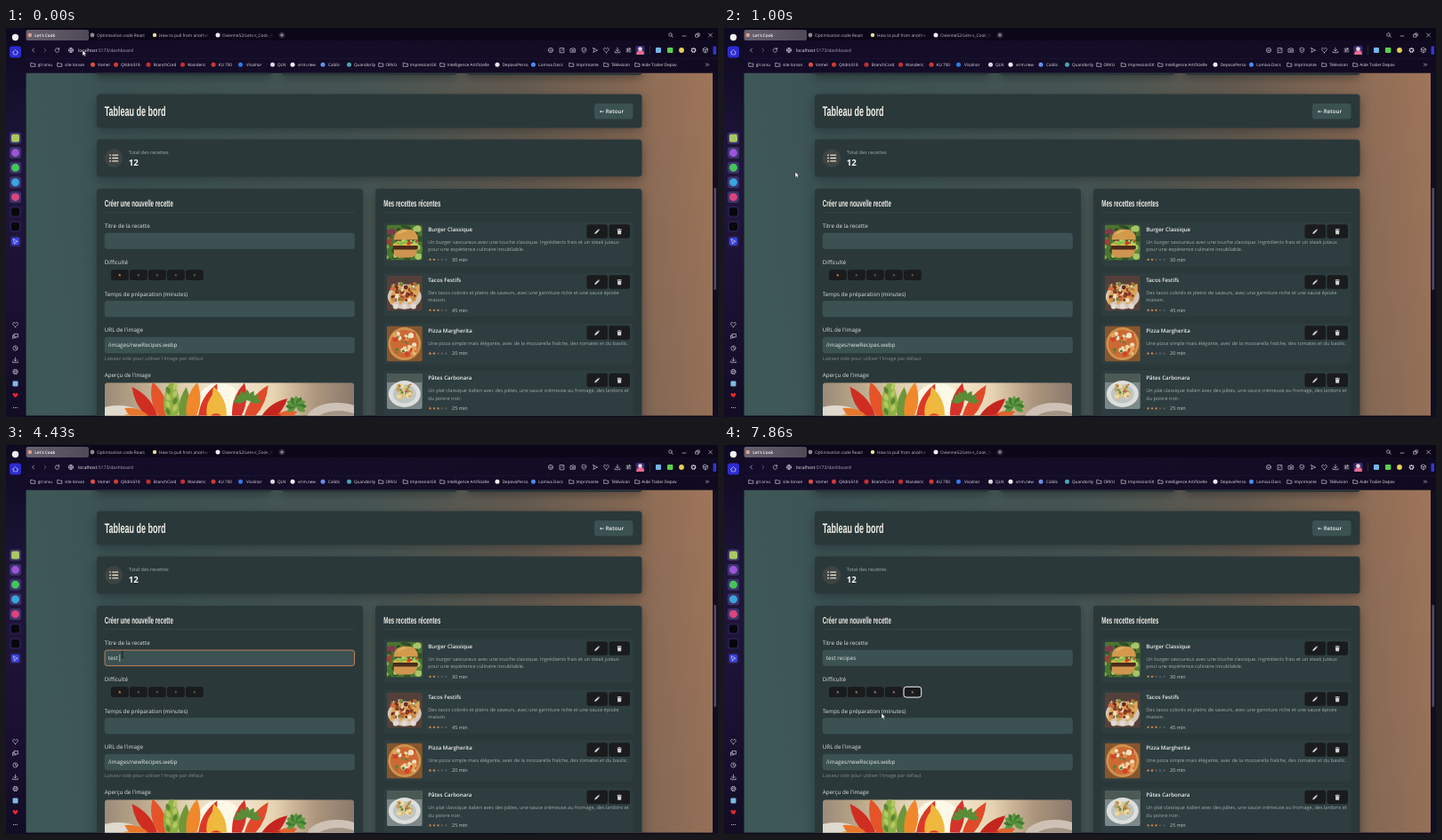
Animation, 800 px wide and 438 px high, one loop 8 s. Source, as an HTML page:

```html
<!DOCTYPE html>
<html lang="fr">
<head>
<meta charset="utf-8">
<title>Let's Cook</title>
<style>
html, body { margin: 0; width: 100%; height: 100%; overflow: hidden; background: #0b0718; }
svg { display: block; width: 100vw; height: 100vh; }
text { font-family: "Open Sans", "Noto Sans", sans-serif; white-space: pre; text-rendering: geometricPrecision; }
.head { font-family: "Liberation Sans", sans-serif; font-weight: 700; fill: #f1eee6; }
.card { fill: #2a383a; filter: drop-shadow(0 3px 6px rgba(14, 20, 22, .42)); }
.line { fill: none; stroke: #d6d3e0; stroke-width: .65; stroke-linecap: round; stroke-linejoin: round; }
.field { fill: #3b5152; stroke: #465b5b; stroke-width: .4; }
.field.on { stroke: #d08a5e; stroke-width: .9; }
.star { fill: #5c5e60; }
.star.lit { fill: #d88d55; }
.star.soft { fill: #a9846b; }
</style>
</head>
<body>
<svg id="stage" viewBox="0 0 800 438" preserveAspectRatio="none"></svg>
<script>
const stage = document.getElementById('stage');
const out = [];
const add = s => out.push(s);

const rect = (x, y, w, h, fill, r = 0, more = '') =>
  add(`<rect x="${x}" y="${y}" width="${w}" height="${h}" rx="${r}" fill="${fill}" ${more}/>`);
const dot = (x, y, r, fill, more = '') => add(`<circle cx="${x}" cy="${y}" r="${r}" fill="${fill}" ${more}/>`);
const oval = (x, y, rx, ry, fill) => add(`<ellipse cx="${x}" cy="${y}" rx="${rx}" ry="${ry}" fill="${fill}"/>`);
const text = (x, y, s, size, fill = '#e4e8e6', weight = 400, more = '') =>
  add(`<text x="${x}" y="${y}" font-size="${size}" fill="${fill}" font-weight="${weight}" ${more}>${s}</text>`);
const head = (x, y, s, size) =>
  add(`<text class="head" transform="translate(${x} ${y}) scale(.584 1)" font-size="${size}">${s}</text>`);
const icon = (x, y, d, more = '') => add(`<path class="line" transform="translate(${x} ${y})" d="${d}" ${more}/>`);
const leaf = (x, y, len, w, turn, fill) =>
  add(`<path transform="translate(${x} ${y}) rotate(${turn})" fill="${fill}" d="M0 0Q${w} ${-len / 2} 0 ${-len}Q${-w} ${-len / 2} 0 0z"/>`);

const starPath = r => {
  let d = '';
  for (let i = 0; i < 10; i++) {
    const a = Math.PI * (i / 5 - .5), q = i % 2 ? r * .42 : r;
    d += (i ? 'L' : 'M') + (q * Math.cos(a)).toFixed(2) + ' ' + (q * Math.sin(a)).toFixed(2);
  }
  return d + 'z';
};
const star = (x, y, r, cls, id = '') =>
  add(`<path ${id} class="star ${cls}" transform="translate(${x} ${y})" d="${starPath(r)}"/>`);

let seed = 7;
const rnd = () => (seed = (seed * 16807) % 2147483647) / 2147483647;
function scatter(n, x, y, w, h, r, colors) {
  for (let i = 0; i < n; i++)
    dot((x + rnd() * w).toFixed(1), (y + rnd() * h).toFixed(1), (r * (.5 + rnd() * .7)).toFixed(2), colors[i % colors.length]);
}
const clipTo = (id, x, y, w, h, r, draw) => {
  add(`<clipPath id="${id}"><rect x="${x}" y="${y}" width="${w}" height="${h}" rx="${r}"/></clipPath><g clip-path="url(#${id})">`);
  draw();
  add('</g>');
};
const grad = (id, dir, ...stops) => add(`<linearGradient id="${id}" ${dir}>` +
  stops.map(([o, c, a = 1]) => `<stop offset="${o}" stop-color="${c}" stop-opacity="${a}"/>`).join('') + '</linearGradient>');
const fade = (id, x) => grad(id, `gradientUnits="userSpaceOnUse" x1="${x - 10}" x2="${x}" y1="0" y2="0"`, [0, '#c4c0ce'], [1, '#c4c0ce', 0]);

grad('page', 'x1="0" y1="0.06" x2="1" y2="0"', [0, '#3e5757'], [.12, '#3d5354'], [.5, '#485755'], [.72, '#665c51'], [.9, '#8d6c56'], [1, '#9f7559']);
grad('bar', 'x1="0" y1="0" x2="1" y2="0"', [0, '#130c28'], [.5, '#140d27'], [1, '#100a20']);
grad('side', 'x1="0" y1="0" x2="0" y2="1"', [0, '#0e0920'], [.35, '#1f163b'], [.75, '#191031'], [1, '#120c24']);
grad('tab', 'x1="0" y1="0" x2="1" y2="0"', [0, '#68626f'], [1, '#4f4957']);
fade('fadeA', 229);
fade('fadeB', 301);

const FOLDER = 'M-2.4 -1.9h1.7l.8 .8h2.3v3.1h-4.8z';
const HEART = 'M0 2.6C-5 -.6 -2.4 -4.4 0 -1.5C2.4 -4.4 5 -.6 0 2.6z';
const RING = 'M2.6 0A2.6 2.6 0 1 1 -2.6 0A2.6 2.6 0 1 1 2.6 0';
const DOWN = 'M0 -2.8V1M-1.7 -.6L0 1.1L1.7 -.6M-2.8 1.2V2.7H2.8V1.2';

function browser() {
  rect(0, 0, 800, 438, '#0b0718');
  rect(22, 14, 778, 37, 'url(#bar)');
  rect(22, 34.6, 778, .4, '#221a40');
  rect(0, 0, 22, 438, 'url(#side)');

  // tabs
  rect(22.5, 2, 70.5, 12, 'url(#tab)', 2);
  dot(26.8, 8, 2.3, '#d9a08c');
  text(32.3, 10, 'Let\'s Cook', 4.65, '#fff', 600);
  dot(97, 8, 2.4, '#8b8892');
  text(102, 10, 'Optimisation code React', 4.75, '#c4c0ce');
  dot(167, 8, 2.2, '#e9d9a5');
  text(172, 10, 'How to pull from another', 4.75, 'url(#fadeA)');
  dot(238, 8, 2.5, '#f0eef5');
  text(243, 10, 'Ovienne52/Lets-s_Cook_Re', 4.75, 'url(#fadeB)');
  dot(310, 8, 3.5, '#2a2438');
  icon(310, 8, 'M-1.8 0H1.8M0 -1.8V1.8');
  icon(746.5, 7.5, 'M1.8 0A1.8 1.8 0 1 1 -1.8 0A1.8 1.8 0 1 1 1.8 0M1.3 1.3L2.9 2.9');
  icon(762, 9, 'M-2 0H2');
  icon(777, 8, 'M-2 -.8H1V2.1H-2zM-.8 -.8V-2H2.2V.9H1');
  icon(791.5, 8, 'M-2 -2L2 2M-2 2L2 -2');

  // address row
  icon(30.5, 25, 'M1 -2L-1 0L1 2');
  icon(44, 25, 'M-1 -2L1 0L-1 2', 'opacity=".5"');
  icon(57.5, 25, 'M1.9 -1.3A2.3 2.3 0 1 0 2.3 .5M2.2 -2.6V-1H.6');
  icon(73, 25, RING + 'M-2.6 0H2.6M0 -2.6Q-2.2 0 0 2.6Q2.2 0 0 -2.6');
  text(81, 27, 'localhost<tspan fill="#aaa5b8">:5173/dashboard</tspan>', 5.1, '#f1eff6');
  [RING + 'M-1.1 .6Q0 1.9 1.1 .6M-.9 -.8V-.6M.9 -.8V-.6', 'M-2.4 2.4V-2.4H2.4V2.4zM-.8 .8L1.4 -1.4',
    'M-2.6 -1.6H-1L-.5 -2.4H.7L1.2 -1.6H2.6V2.2H-2.6zM1 .3A1 1 0 1 1 -1 .3A1 1 0 1 1 1 .3',
    'M0 -2.7L2.3 -1.8V.2Q2 2 0 2.8Q-2 2 -2.3 .2V-1.8zM-1 0L-.2 .8L1.1 -.7', 'M-2.2 -2.4L2.6 0L-2.2 2.4L-1.3 0z',
    HEART, DOWN, 'M-2.4 -1.8H2.4M-2.4 0H2.4M-2.4 1.8H2.4M.9 -2.6V-1M-.9 -.8V.8'
  ].forEach((d, i) => icon(612 + i * 12.5, 25, d));
  rect(707.5, 20, 10, 10, '#3a2b74', 2);
  add('<path d="M708 30q1-5 5-5t4 5z" fill="#e76b8e"/>');
  dot(712.5, 23.5, 2.3, '#e8d7dc');
  rect(723, 20, .5, 10, '#4a4463');
  rect(730, 22, 6, 6, '#76b5e8', 1);
  rect(743, 22, 6.4, 6, '#5ad04c', 1);
  dot(759, 25, 2.9, '#e3cf58');
  dot(772.5, 25, 2.1, 'none', 'stroke="#f3f1f8" stroke-width="1.5" stroke-dasharray="1.2 .45"');
  icon(785.8, 25, 'M0 -2.8L2.5 -1.4V1.4L0 2.8L-2.5 1.4V-1.4zM-2.5 -1.4L0 0L2.5 -1.4M0 0V2.8');
  rect(794.5, 20.5, 3.5, 9.5, '#3434d6', 1);

  // bookmarks: icon x, text x, label, colour (none = folder)
  [[30.5, 35.7, 'git orvu'], [60.5, 66, 'site lorvan'], [97.5, 103, 'Vomel', '#dc5044'],
    [123.5, 129, 'QXdro518', '#d33a35'], [160, 165.7, 'BranchCord', '#c72f30'], [198.5, 204, 'Wanderic', '#c72f30'],
    [233, 238.6, 'KU 700', '#cc3a39'], [263.5, 270, 'Visalnor', '#2f7bea'], [299.5, 305, 'QLN', '#dad8e0'],
    [322, 328, 'vrim.new', '#f2f1f5'], [356, 362, 'Caldis', '#6b8df0'], [385.5, 391, 'Quandorily', '#4aa7b4'],
    [421.5, 426.4, 'ORVU'], [449, 454, 'ImpressionStl'], [490.5, 495.6, 'Intelligence Artificielle'],
    [552, 557.7, 'DepovaPerso', '#f0eef5'], [592.5, 598.3, 'Lomiva Docs', '#4a8cf0'], [635.5, 640.4, 'Imprimante'],
    [674.5, 680, 'Télévision'], [709.5, 714.3, 'Aide Tralier Depov']
  ].forEach(([x, tx, s, c]) => {
    c ? dot(x, 41.3, 2.5, c) : icon(x, 41.3, FOLDER);
    text(tx, 43, s, 4.65, '#e6e3ec');
  });
  icon(788, 41.3, 'M-1.6 -1.3L-.3 0L-1.6 1.3M.4 -1.3L1.7 0L.4 1.3');

  // sidebar
  dot(10.5, 10.5, 3.7, '#f4f2f8');
  rect(4, 20.5, 13, 13, '#2c2bd0', 3);
  icon(10.5, 27.3, 'M-3 .2L0 -2.9L3 .2M-2.2 -.5V2.6H2.2V-.5');
  ['#a9c763', '#9b55d8', '#45c45b', '#39a5dc', '#d9457f', '#08070c', '#08070c', '#3b43dc'].forEach((c, i) => {
    const y = 124 + i * 16.6;
    rect(4, (y - 6.5).toFixed(1), 13, 13, i < 5 ? '#3c3368' : '#261d48', 3);
    i == 0 || i > 4 ? rect(6, (y - 4.5).toFixed(1), 9, 9, c, 2) : dot(10.5, y.toFixed(1), 4.5, c);
  });
  icon(10.5, 240.2, 'M-2 -2.5L2.6 .2L.4 .7L-.7 2.7z');
  icon(10.5, 334, HEART);
  icon(10.5, 347, 'M-1 -2.5H3V1H-1zM-1 -.9H-3V2.8L-1.7 1.8H.6V1');
  icon(10.5, 360.5, RING + 'M0 -1.5V.1L1.2 .8');
  icon(10.5, 374, DOWN);
  dot(10.5, 387, 2.5, 'none', 'stroke="#d6d3e0" stroke-width="1.1" stroke-dasharray="1.4 .55"');
  dot(10.5, 387, 1, 'none', 'stroke="#d6d3e0" stroke-width=".6"');
  rect(7.5, 397.5, 6, 6, '#83b8df', 1);
  add(`<path transform="translate(10.5 413.5)" d="${HEART}" fill="#e52434"/>`);
  [-2, 0, 2].forEach(k => dot(10.5 + k, 427.5, .6, '#d6d3e0'));
}

function photo(i, x, y) {
  clipTo('pic' + i, x, y, 40, 40, 2, () => {
    const cx = x + 20, cy = y + 20;
    if (i == 0) {
      rect(x, y, 40, 40, '#4c7530');
      scatter(40, x, y, 40, 40, 3.4, ['#7fae45', '#2f4a25', '#a8c46a', '#5b8a34', '#34512a']);
      scatter(6, x, y + 4, 7, 20, 3, ['#a63c32', '#7c3a4a']);
      add(`<path d="M${x + 8} ${y + 33}v-6h26v3q-2 7-9 7h-10q-5 0-7-4z" fill="#cf9550"/>`);
      rect(x + 7, y + 23, 28, 5, '#4a2c1c', 2);
      rect(x + 7, y + 21, 28, 2.6, '#e6b640', 1);
      scatter(16, x + 7, y + 17, 28, 4, 2.2, ['#8cc04b', '#c8402f', '#b0d46a']);
      add(`<path d="M${x + 8} ${y + 17}q0-12 13.500-12t13.500 12z" fill="#d39a4e"/>`);
      add(`<path d="M${x + 12} ${y + 11}q4-5 11-4.500q-6 1-11 4.500z" fill="#ecc98c"/>`);
    } else if (i == 1) {
      rect(x, y, 40, 40, '#54403a');
      oval(cx, cy + 4, 19, 14, '#d2c6b8');
      [0, 1, 2].forEach(k => leaf(x + 4 + k * 10, y + 33, 27, 10, 28, '#dca658'));
      scatter(50, x + 5, y + 9, 28, 20, 2.2, ['#8e3d26', '#d2693c', '#7c8a40', '#f0dfc3', '#6a2b1e', '#c98c4a']);
      [0, 1, 2].forEach(k => dot(x + 10 + k * 10, y + 35, 3, '#e5d8d3'));
    } else if (i == 2) {
      rect(x, y, 40, 40, '#86572f');
      dot(cx, cy, 18.5, '#cf9350');
      dot(cx, cy, 15.8, '#cc6a34');
      scatter(26, x + 8, y + 8, 24, 24, 2.8, ['#f2e2c2', '#eed3a0', '#cf4528', '#e2a45c']);
      scatter(9, x + 11, y + 11, 19, 19, 1.6, ['#54823a']);
    } else {
      rect(x, y, 40, 40, '#7d888a');
      rect(x, y, 40, 10, '#4b5a55');
      oval(cx, cy + 3, 18, 15, '#dddfdd');
      oval(cx, cy + 3, 13, 10.5, '#bfc5c4');
      scatter(28, x + 11, y + 13, 17, 15, 2.6, ['#dcc282', '#c3a25c', '#ead9a4']);
      scatter(10, x + 13, y + 12, 14, 11, 1.4, ['#6a8a3e', '#a8694a']);
    }
  });
}

function recipe(i, y, h, title, lines, score, mins) {
  rect(424.5, y - 3, 280, h, '#2e3d3f', 2.5);
  photo(i, 427.8, y);
  text(474.3, y + 7.2, title, 6.15, '#eef0ef', 600);
  lines.forEach((s, k) => text(474.3, y + 21.3 + k * 8.4, s, 5.53, '#a4adab'));
  const base = y + 32.8 + (lines.length - 1) * 8.4;
  for (let k = 0; k < 5; k++) star(476.5 + k * 4.5, base - 1.9, 1.9, k < score ? 'lit' : '');
  text(501, base, mins + ' min', 5.5, '#c4cac8');
  for (const x of [652.5, 677.5]) rect(x, y - .3, 23.5, 15.6, '#191b1d', 2.5);
  const cy = y + 7.6;
  add(`<path transform="translate(664.2 ${cy})" fill="#cfd3d2" d="M-2.900 2.900L-2.500 1.100L.8 -2.200L2.200 -.8L-1.100 2.500zM1.200 -2.600L1.700 -3L3 -1.700L2.600 -1.200z"/>`);
  add(`<path transform="translate(689.2 ${cy})" fill="#cfd3d2" d="M-2.600 -2.500H-1L-.6 -3.100H.6L1 -2.500H2.600V-1.800H-2.600zM-2.200 -1.300H2.200L1.900 3.100H-1.900z"/>`);
}

function preview() {
  grad('wood', 'x1="0" y1="0" x2="1" y2="0"', [0, '#9b8a78'], [.14, '#b9a689'], [.3, '#dccbaa'], [.48, '#f7efdb'], [.68, '#e6d3b0'], [.85, '#ab947c'], [1, '#8a7a6c']);
  clipTo('preview', 111, 399.5, 280, 45, 3, () => {
    rect(111, 399, 280, 46, 'url(#wood)');
    oval(126, 442, 32, 17, '#e0d9cd');
    oval(372, 440, 34, 18, '#cdc2b5');
    oval(374, 443, 26, 12, '#a39585');
    oval(240, 424, 26, 24, '#fdf8e8');
    [[172, 446, 52, 14, -36, '#cf2d22'], [168, 448, 40, 14, -60, '#e8772c'], [180, 446, 50, 15, -18, '#e5532a'],
      [186, 450, 54, 18, 0, '#8fb043'], [198, 448, 44, 12, 6, '#6f9638'], [206, 448, 50, 15, 10, '#f0882b'],
      [216, 448, 52, 14, 24, '#d93a28'], [230, 448, 36, 12, 4, '#f3b63c'], [246, 448, 46, 14, -16, '#efb83e'],
      [256, 448, 50, 14, 14, '#d4332a'], [266, 448, 54, 14, 32, '#e04a2a'], [282, 448, 46, 13, 48, '#c4261f'],
      [292, 446, 38, 12, 68, '#e3622d']].forEach(a => leaf(...a));
    for (let k = 0; k < 8; k++) leaf(184 + k % 2 * 4, 436 - k * 4, 9, 5, k % 2 ? 25 : -25, k % 3 ? '#b4c766' : '#5e8632');
    for (let k = 0; k < 7; k++) leaf(268 + k, 420, 13, 6, -90 + k * 30, '#5b8c38');
    for (let k = 0; k < 9; k++) leaf(326, 426, 12, 6, -120 + k * 30, k % 2 ? '#3f7a34' : '#5d973f');
    dot(236, 443, 9, '#d8402c');
    dot(304, 441, 7, '#c72c24');
    dot(136, 441, 6, '#d99a3c');
  });
}

function page() {
  add('<clipPath id="view"><rect x="22.500" y="50.800" width="771.500" height="385.700"/></clipPath><g clip-path="url(#view)">');
  rect(22, 50, 773, 387, 'url(#page)');
  const card = (x, y, w, h) => rect(x, y, w, h, '', 3.5, 'class="card"');
  [101.5, 310, 518].forEach(x => card(x, 30, 196.5, 23));
  card(102, 74.5, 612.5, 38);
  card(102, 125.5, 612.5, 41.7);
  card(102, 181, 299, 300);
  card(415, 181, 299.5, 300);

  head(110.8, 98.7, 'Tableau de bord', 15.4);
  rect(661, 85, 43.5, 17.5, '#3b5152', 3);
  text(667, 96, '<tspan font-family="DejaVu Sans, sans-serif">←</tspan> Retour', 6.2, '#f1f3f2', 600);
  dot(121, 146.5, 10.2, '#3e4443');
  [-3.4, 0, 3.4].forEach(d => {
    dot(117, 146.5 + d, .9, '#e9ddcb');
    rect(119.2, 145.8 + d, 7, 1.4, '#e9ddcb', .4);
  });
  text(137.8, 142.2, 'Total des recettes', 5.5, '#a4adab');
  text(137.8, 155, '12', 9.7, '#f5f6f5', 700);

  head(110.8, 200.6, 'Créer une nouvelle recette', 10.5);
  head(424.3, 200.6, 'Mes recettes récentes', 10.5);
  rect(111, 207.3, 280.5, .5, '#435152');
  rect(424.5, 207.3, 280.5, .5, '#435152');
  const label = (y, s) => text(110.8, y, s, 6.27, '#dfe3e1', 500);
  const field = (y, id = '') => rect(111, y, 280.5, 17.6, '', 2.8, `class="field" ${id}`);
  label(225, 'Titre de la recette');
  field(231, 'id="title"');
  label(266.2, 'Difficulté');
  for (let i = 0; i < 5; i++) {
    rect(118 + i * 21, 272.3, 19.7, 11.8, '#191b1d', 2.8, `id="rate${i}"`);
    star(127.8 + i * 21, 278.3, 1.9, '', `id="star${i}"`);
  }
  label(301.6, 'Temps de préparation (minutes)');
  field(307.4);
  label(342.4, 'URL de l\'image');
  field(348.3);
  text(114.8, 359.4, '/images/newRecipes.webp', 6.27, '#e6eae8');
  text(110.8, 373.6, 'Laissez vide pour utiliser l\'image par défaut', 5.5, '#7f8a89');
  label(393.2, 'Aperçu de l\'image');
  preview();

  recipe(0, 221.5, 49.5, 'Burger Classique', ['Un burger savoureux avec une touche classique. Ingrédients frais et un steak juteux', 'pour une expérience culinaire inoubliable.'], 2, 30);
  recipe(1, 278.5, 49.5, 'Tacos Festifs', ['Des tacos colorés et pleins de saveurs, avec une garniture riche et une sauce épicée', 'maison.'], 3, 45);
  recipe(2, 335.6, 46, 'Pizza Margherita', ['Une pizza simple mais élégante, avec de la mozzarella fraîche, des tomates et du basilic.'], 2, 20);
  recipe(3, 389, 60, 'Pâtes Carbonara', ['Un plat classique italien avec des pâtes, une sauce crémeuse au fromage, des lardons et', 'du poivre noir.'], 3, 25);
  add('</g>');
  rect(794, 50.8, 6, 388, '#120d22');
  rect(795.3, 180, 2.8, 115, '#4b4763', 1.4);
}

browser();
page();
text(114.8, 242, '', 6.27, '#e6eae8', 400, 'id="typed"');
rect(0, 236, .6, 8, '#f2f2f0', 0, 'id="caret"');
add('<path id="beam" d="M-1 -3.200H1M0 -3.200V3.200M-1 3.200H1" fill="none" stroke="#0a0c0c" stroke-width=".7"/>');
add('<path id="arrow" d="M0 0V6.200L1.500 4.900L2.500 7L3.500 6.500L2.500 4.500H4.500z" fill="#fff" stroke="#111" stroke-width=".4"/>');
stage.innerHTML = out.join('');

const LOOP = 8000, FPS = 7;
const FOCUS = 1570, CLICK = 7430, WORDS = 'test recipes';
const KEYS = [2570, 2860, 3290, 3430, 4430, 4710, 4860, 5290, 5430, 5710, 5860, 6140];
const PATH = [[0, 86, 25], [140, 79, 52], [290, 69, 98], [430, 64, 123], [570, 62, 132], [710, 62, 132],
  [1000, 80, 162], [1140, 102, 200], [1290, 121, 226], [1430, 130, 235], [1570, 132, 236], [1860, 132, 236],
  [2140, 130.7, 236], [6430, 130.7, 236], [6570, 143, 251], [6710, 171, 279], [6860, 190, 293],
  [7000, 201, 289], [7140, 210, 281], [7290, 212, 279], [7570, 212, 279], [7710, 195, 292], [7860, 177, 302], [8000, 177, 302]];

const $ = id => document.getElementById(id);
const show = (el, on) => el.setAttribute('visibility', on ? 'visible' : 'hidden');

function pointer(t) {
  const i = Math.max(1, PATH.findIndex(p => p[0] > t));
  const [t0, x0, y0] = PATH[i - 1], [t1, x1, y1] = PATH[i];
  const k = Math.min(1, (t - t0) / (t1 - t0));
  return [x0 + (x1 - x0) * k, y0 + (y1 - y0) * k];
}

function draw(ms) {
  const t = Math.round(Math.floor((ms % LOOP + 5) * FPS / 1000) * 100 / FPS) * 10;
  const count = KEYS.filter(k => k <= t).length;
  const focused = t >= FOCUS && t < CLICK, rated = t >= CLICK;
  $('typed').textContent = WORDS.slice(0, count);
  $('title').classList.toggle('on', focused);
  const since = t - (count ? KEYS[count - 1] : FOCUS);
  show($('caret'), focused && since % 1000 < 425);
  $('caret').setAttribute('x', 115 + (count ? $('typed').getComputedTextLength() : 0));
  for (let i = 0; i < 5; i++) {
    $('star' + i).classList.toggle('soft', rated);
    $('star' + i).classList.toggle('lit', !rated && i == 0);
  }
  $('rate4').setAttribute('stroke', rated ? '#f4f4f4' : 'none');

  const [x, y] = pointer(t);
  const over = x > 111 && x < 391 && y > 231 && y < 249;
  show($('beam'), over);
  show($('arrow'), !over);
  $(over ? 'beam' : 'arrow').setAttribute('transform', `translate(${x} ${y})`);
}

let start;
function tick(now) {
  start ??= now;
  draw(now - start);
  requestAnimationFrame(tick);
}
draw(0);
requestAnimationFrame(tick);
</script>
</body>
</html>
```
